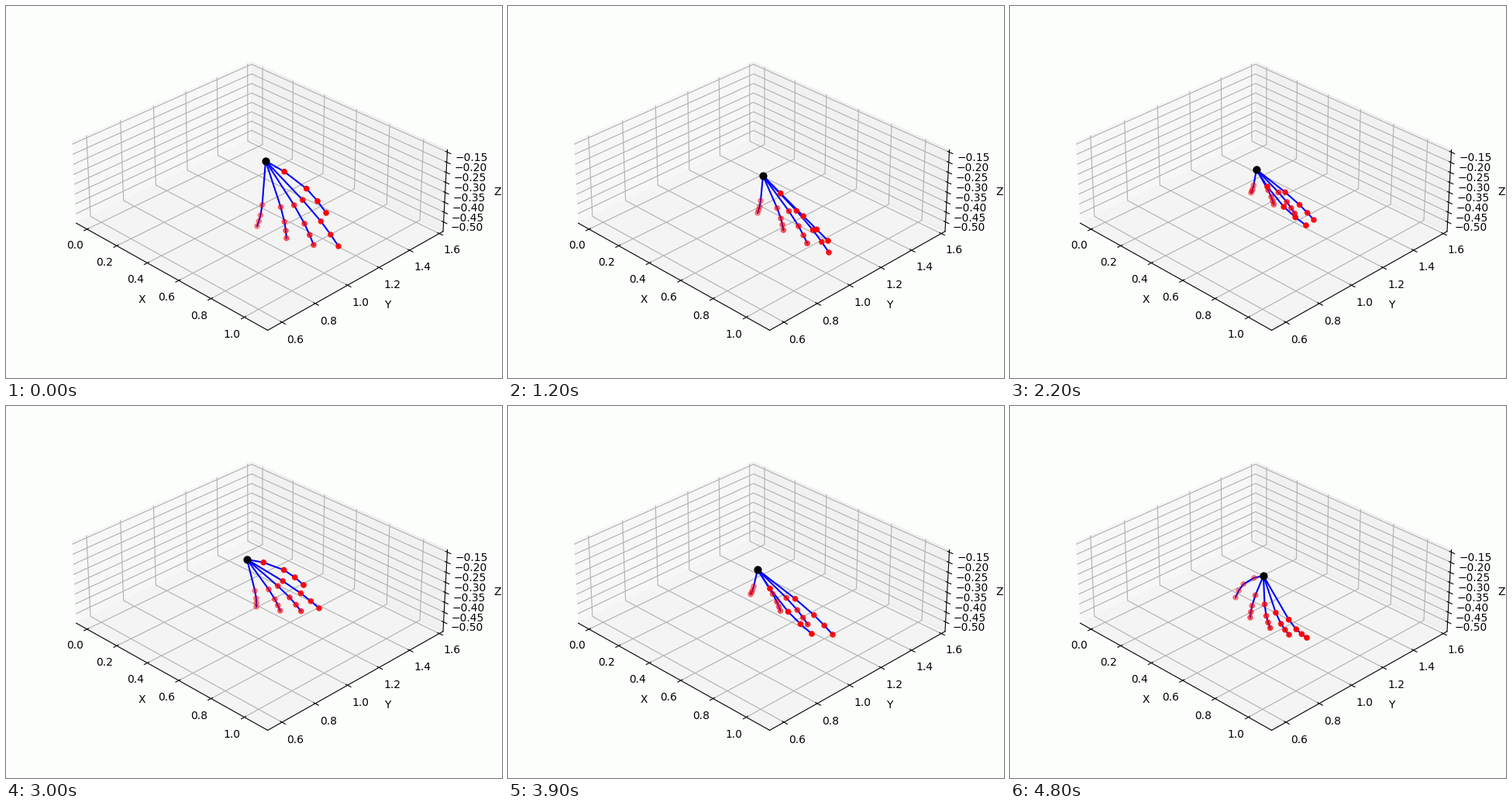
These frames come from a looping animation (640 px wide and 480 px high, 4900 ms). A matplotlib script:

```python
import numpy as np
import matplotlib.pyplot as plt
from matplotlib.animation import FuncAnimation

W, H, DPI = 640, 480, 100
FRAMES, INTERVAL = 49, 100
PAPER = "#fcfefc"


def pose(wrist, thumb, index, little, turn):
    """Wrist in stage pixels, three fingertips relative to it, thumb bend in degrees."""
    return np.array([wrist, thumb, index, little, turn], complex)


def scaled(key, size):
    return key * [1, size, size, size, 1]


def build(key):
    """Joints as a 5 x 5 complex array (finger, joint) and one shade per finger."""
    wrist, thumb, index, little, turn = key
    side = np.clip((index - little).real / 70, -1, 1)

    # The inner fingers lie between index and little finger, a bit further out.
    across = np.linspace(0, 1, 4)
    bulge = 0.16 * across * (1 - across)
    inner = index * (1 - across + bulge) + little * (across + bulge)
    tips = np.append(thumb, inner)

    reach = np.append(0.27, np.linspace(0.48, 0.67, 4))
    bend = np.radians(np.append(turn.real, np.full(4, 1 - 4 * side)))
    root = reach * tips * np.exp(1j * bend)
    span = tips - root
    mid = root + 0.25 * span + 0.23 * abs(span) * np.exp(1j * np.angle(root))
    last = mid + 0.55 * (tips - mid) + 0.12 * (2 * mid - root - tips)

    joints = wrist + np.array([0 * tips, root, mid, last, tips]).T
    shade = 0.7 + 0.3 * side * np.linspace(1, -1, 5)
    return joints, shade


spread = pose(335 + 200j, 78 + 67j, 94 + 110j, -11 + 84j, -11)
curled = pose(329 + 204j, -50 + 6j, -42 + 64j, 32 + 88j, -28)

keys = {
    0: spread,
    2: scaled(spread, 1.5),
    5: scaled(curled, 2.3),
    7: curled,
    12: pose(329 + 219j, 84 + 84j, 85 + 99j, -7 + 48j, 0),
    22: pose(318 + 211j, 64 + 72j, 74 + 65j, -7 + 30j, 9),
    30: pose(311 + 198j, 73 + 33j, 93 + 63j, 12 + 61j, -14),
    39: pose(322 + 211j, 70 + 83j, 97 + 84j, -9 + 32j, 7),
    48: pose(327 + 219j, -36 + 28j, -17 + 54j, 56 + 80j, 25),
}
# The hand turns over and back between the open poses.
keys.update({t: scaled(curled, 1.6) for t in range(18, 43, 8)})
keys.update({t: scaled(spread, 1.03) for t in (14, 37, 45)})
times = sorted(keys)


def key_at(i):
    k = min(np.searchsorted(times, i, side="right") - 1, len(times) - 2)
    t0, t1 = times[k], times[k + 1]
    ease = (1 - np.cos(np.pi * (i - t0) / (t1 - t0))) / 2
    return keys[t0] + (keys[t1] - keys[t0]) * ease


fig = plt.figure(figsize=(W / DPI, H / DPI), dpi=DPI, facecolor=PAPER)

box = fig.add_axes([0, 0, 1, 1], projection="3d", facecolor="none")
lims = np.array([(-0.074, 1.137), (0.516, 1.626), (-0.548, -0.138)])
box.set(xlim=lims[0], ylim=lims[1], zlim=lims[2],
        xlabel="X", ylabel="Y", zlabel="Z",
        xticks=np.arange(6) * 0.2, yticks=0.6 + np.arange(6) * 0.2,
        zticks=-0.5 + np.arange(8) * 0.05)
box.set_box_aspect(np.ptp(lims, axis=1) * [1, 1, 1.015])
box.view_init(elev=30, azim=-45)

# Flat layer in stage pixels for the hand.
layer = fig.add_axes([0, 0, 1, 1], facecolor="none")
layer.axis("off")
bones = [layer.plot([], [], color="blue", lw=1.5, zorder=2)[0] for _ in range(5)]
dots = layer.scatter(np.zeros(20), np.zeros(20), s=20, color="red", zorder=3)
wrist = layer.scatter([0], [0], s=40, color="black", zorder=4)
layer.set(xlim=(0, W), ylim=(H, 0))


def update(i):
    joints, shade = build(key_at(i))
    for bone, chain in zip(bones, joints):
        bone.set_data(chain.real, chain.imag)
    beads = joints[:, 1:].ravel()
    dots.set_offsets(np.c_[beads.real, beads.imag])
    dots.set_color([(1, 0, 0, a) for a in np.repeat(shade, 4)])
    wrist.set_offsets([(joints[0, 0].real, joints[0, 0].imag)])
    return [*bones, dots, wrist]


anim = FuncAnimation(fig, update, frames=FRAMES, interval=INTERVAL,
                     init_func=lambda: update(0), repeat=True, repeat_delay=0)
plt.show()
```
